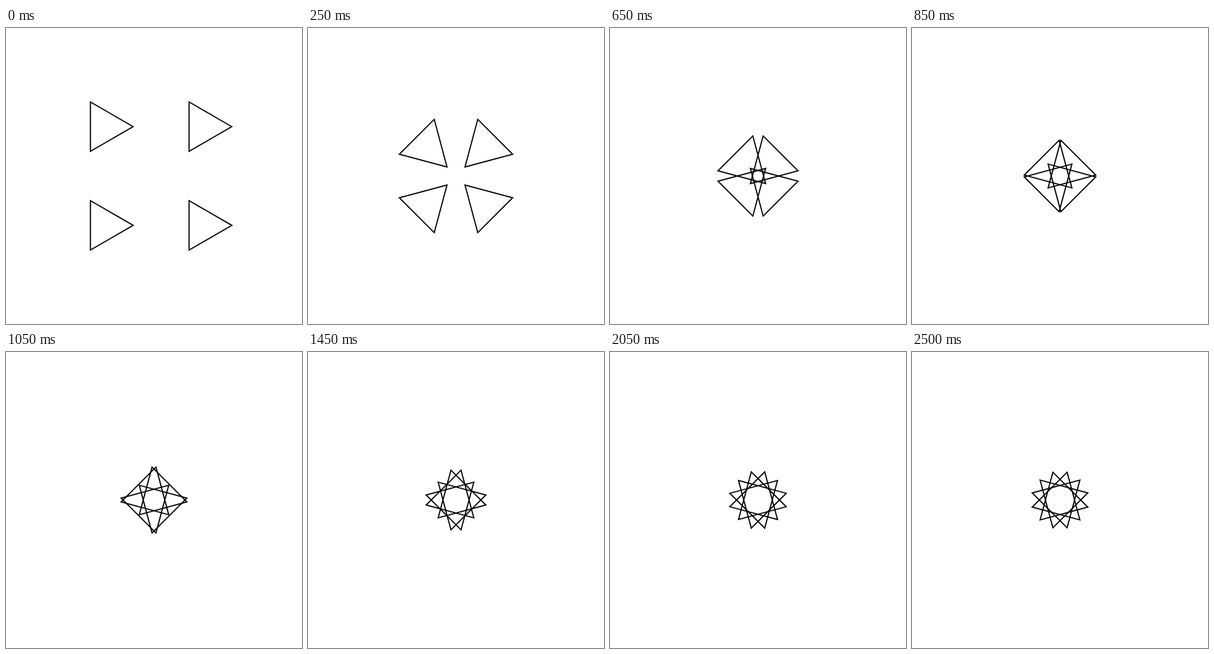
Animation, 500 px wide and 500 px high, one loop 2.55 s. Source, as an HTML page with a canvas:

```html
<!DOCTYPE html>
<html lang="en">
<head>
<meta charset="utf-8">
<title>Converging triangles</title>
<style>
  html, body { margin: 0; width: 100%; height: 100%; overflow: hidden; background: #fff; }
  canvas { display: block; }
</style>
</head>
<body>
<canvas id="stage" width="500" height="500"></canvas>
<script>
const ctx = document.getElementById('stage').getContext('2d');
const SIZE = 500;
const CENTER = SIZE / 2;
const START_OFFSET = SIZE / 6;
const RADIUS = SIZE / 6 / Math.sqrt(3);
const STEP_MS = 50;
const STEPS = 51;
const DECAY = 0.9;

function triangle(x, y, heading) {
  ctx.beginPath();
  for (let i = 0; i < 3; i++) {
    const angle = heading + i * Math.PI * 2 / 3;
    ctx.lineTo(x + RADIUS * Math.cos(angle), y + RADIUS * Math.sin(angle));
  }
  ctx.closePath();
  ctx.stroke();
}

function draw(step) {
  ctx.fillStyle = '#fff';
  ctx.fillRect(0, 0, SIZE, SIZE);
  ctx.strokeStyle = '#000';
  ctx.lineWidth = 2;
  const offset = START_OFFSET * DECAY ** step;
  for (const sx of [-1, 1]) {
    for (const sy of [-1, 1]) {
      // All point right at rest, then snap to face the centre.
      const heading = step === 0 ? 0 : Math.atan2(-sy, -sx);
      triangle(CENTER + sx * offset, CENTER + sy * offset, heading);
    }
  }
}

const start = performance.now();
function tick() {
  const elapsed = performance.now() - start;
  draw(Math.floor(elapsed / STEP_MS) % STEPS);
  requestAnimationFrame(tick);
}
tick();
</script>
</body>
</html>
```
